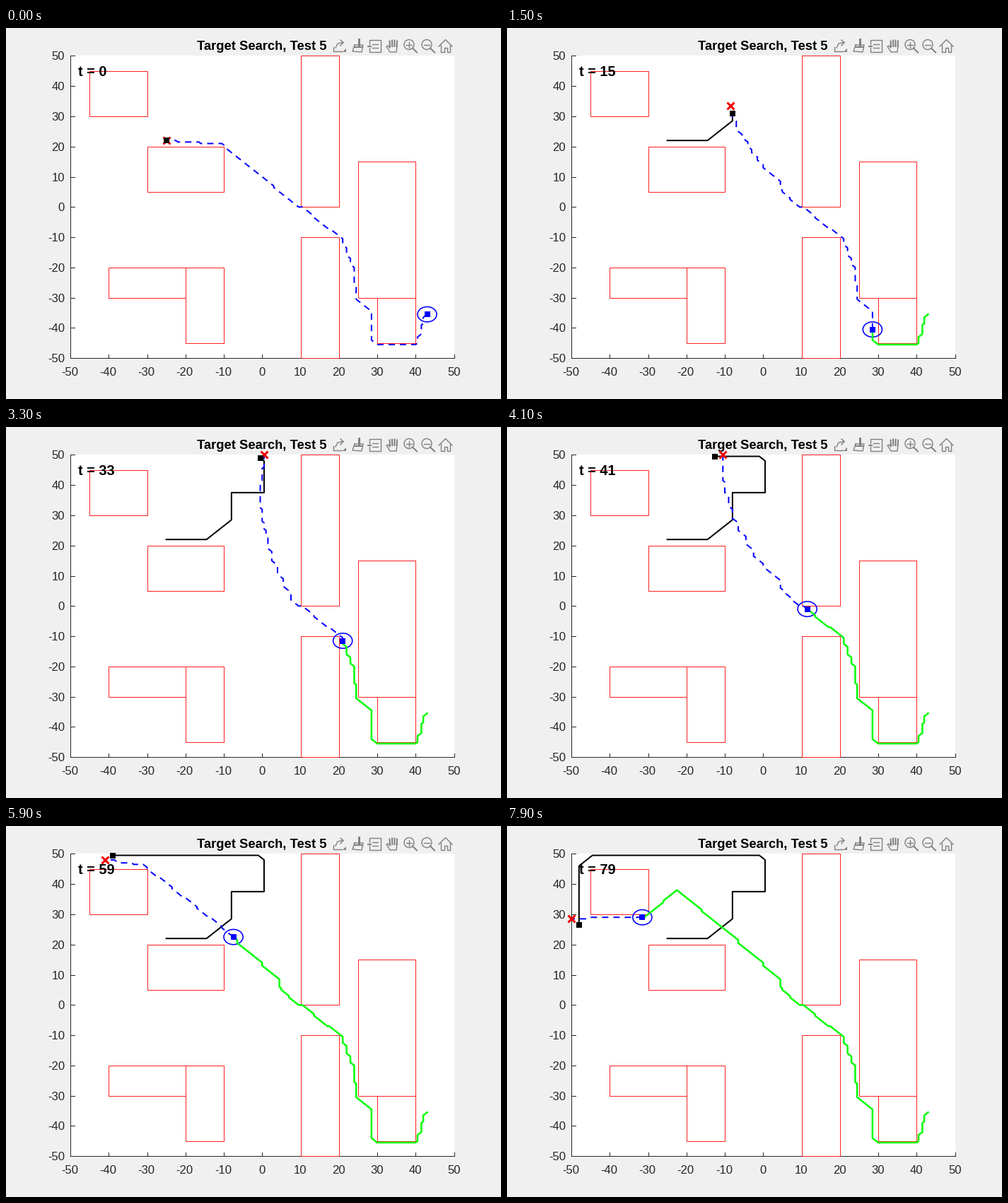
A matplotlib script for the animation above (8000 ms loop, 700 by 525 pixels).

```python
import numpy as np
import matplotlib.pyplot as plt
from matplotlib.animation import FuncAnimation
from matplotlib.patches import Circle, Ellipse, Polygon, Rectangle

W, H, DPI = 700, 525, 100
STEPS, STEP_MS = 80, 100
PT = 72 / DPI  # points per pixel
INK, GREY, BLUE = "#262626", "#808080", "#0000ff"
# Plot box as fractions of the stage, and pixels per data unit.
X0, Y0 = 0.13 * W, H - 0.11 * H
SX, SY = 0.775 * W / 100, 0.815 * H / 100

plt.rcParams["font.family"] = "Liberation Sans"


def px(p):
    """Data units to stage pixels."""
    p = np.asarray(p, float)
    return np.stack([X0 + SX * (p[..., 0] + 50), Y0 - SY * (p[..., 1] + 50)], axis=-1)


def snap(p):
    return np.round(np.asarray(p) * 2) / 2


def grid_route(pts):
    """Join points as on a grid: short blocks of a diagonal, then a straight."""
    out = [np.array(pts[0], float)]
    for goal in np.array(pts[1:], float):
        start = out[-1]
        blocks = max(round(np.abs(goal - start).max() / 3.3), 1)
        for u in np.arange(1, blocks + 1) / blocks:
            stop = goal if u == 1 else snap(start + u * (goal - start))
            d = stop - out[-1]
            out += [out[-1] + np.sign(d) * np.abs(d).min(), stop]
    return np.array(out)


class Path:
    """Polyline that can be read by arc length."""

    def __init__(self, pts):
        self.pts = np.array(pts, float)
        self.cum = np.r_[0, np.cumsum(np.hypot(*np.diff(self.pts, axis=0).T))]

    def at(self, s):
        return np.array([np.interp(s, self.cum, c) for c in self.pts.T])

    def part(self, a, b):
        inner = self.pts[(self.cum > a) & (self.cum < b)]
        return np.vstack([self.at(a), inner, self.at(b)])

    def length_to(self, p):
        return self.cum[np.argmin(np.hypot(*(self.pts - p).T))]


GAP, HUB = (9.5, 0), (0, 14)
QUARRY_SPEED, SEEKER_SPEED = 1.49, 1.79

quarry = Path([(-25, 22), (-14.5, 22), (-8, 28.5), (-8, 37.5), (0.5, 37.5),
               (0.5, 48), (-1, 49.5), (-44.5, 49.5), (-48, 46), (-48, 26.5)])
seeker = Path(grid_route([
    (43, -35.5), (40.5, -45), (40, -45.5), (30, -45.5), (28.5, -43.5),
    (28.5, -34.5), (24.5, -30), (24.5, -26), (24, -20), (21, -10.5),
    (13.5, -3), GAP, (5, 5.5), (4.5, 8.5), HUB, (-10, 25), (-22.5, 38),
    (-30, 30), (-31.5, 29)]))
GAP_S, HUB_S = seeker.length_to(GAP), seeker.length_to(HUB)

# The estimate drifts around the quarry and stays inside the arena.
DRIFT_AT = [0, 15, 24, 41, 52, 66, 79]
DRIFT_X = [0, -.5, -.5, 2, -1.5, -2, -2]
DRIFT_Y = [0, 2.5, 1, .5, -1, -2.5, 2]


def guess(k):
    drift = np.array([np.interp(k, DRIFT_AT, d) for d in (DRIFT_X, DRIFT_Y)])
    return np.clip(snap(quarry.at(QUARRY_SPEED * k) + drift), -50, 50)


def bend(a, b):
    """Curve that climbs more steeply towards its end."""
    d = b - a
    bow = 0.1 * max(d[1] - abs(d[0]), 0)
    u = np.linspace(0, 1, max(int(np.hypot(*d) / 4), 2))[:, None]
    mid = (a + b) / 2 - (2 * bow, 0)
    return snap((1 - u) ** 2 * a + 2 * u * (1 - u) * mid + u ** 2 * b)


def plan(k):
    """Planned way from the seeker to the estimate, round wall corners."""
    s, goal = SEEKER_SPEED * k, guess(k)
    here = seeker.at(s)
    early, late = k < 8, k > 70
    hub_s = GAP_S if early or goal[0] > -5 else HUB_S
    head = seeker.part(s, hub_s) if s < hub_s else snap(here)[None]
    if early:
        corners = [(-10, 20.5)]
    elif late:
        corners = [c for c in [(-30, 29.5), (-45.5, 29)] if c[0] < here[0]]
    else:
        corners = [c for c in [(-30, 45.5), (-45, 45.5)] if c[0] > goal[0] + 1]
    tail = [head[-1], *corners, goal] if corners else bend(head[-1], goal)
    return np.vstack([head, grid_route(tail)])


fig = plt.figure(figsize=(W / DPI, H / DPI), dpi=DPI, facecolor="#f0f0f0")
ax = fig.add_axes([0, 0, 1, 1])
ax.set(xlim=(0, W), ylim=(H, 0))
ax.axis("off")


def line(pts, color, width, **kw):
    x, y = np.array(pts, float).reshape(-1, 2).T
    return ax.plot(x, y, color=color, lw=width * PT, **kw)[0]


def label(x, y, s, size, **kw):
    return ax.text(x, y, s, fontsize=size * PT, va="baseline", **kw)


def rect(x, y, w, h, **kw):
    ax.add_patch(Rectangle(px((x, y)), w * SX, -h * SY, **kw))


def draw_axes():
    rect(-50, -50, 100, 100, fc="white", ec="none", zorder=0)
    line(px([(-50, 50), (-50, -50), (50, -50)]), INK, 1, zorder=1)
    for v in range(-50, 51, 10):
        x, y = px((v, v))
        line([(x, Y0), (x, Y0 - 5.5)], INK, 1, zorder=1)
        line([(X0, y), (X0 + 5.5, y)], INK, 1, zorder=1)
        label(x - (v < 0), 491.5, str(v), 16.67, color=INK, ha="center")
        label(X0 - 8, y + 6, str(v), 16.67, color=INK, ha="right")
    label(361.5, 31, "Target Search, Test 5", 18.33, weight="bold", ha="center")


def draw_walls():
    for box in [(-45, 30, 15, 15), (-30, 5, 20, 15), (-40, -30, 20, 10),
                (-20, -45, 10, 25), (10, 0, 10, 50), (10, -50, 10, 40),
                (25, -30, 15, 45), (30, -45, 10, 15)]:
        rect(*box, fc="none", ec="#ff2020", lw=PT, zorder=2)


def draw_toolbar():
    def stroke(*pts, width=1.4):
        line(pts, GREY, width)

    # share
    stroke((463, 27), (463, 32.5), (475, 32.5))
    stroke((466, 28), (469, 22), (477, 20.5))
    stroke((473, 17), (477, 20.5), (473, 25))
    ax.add_patch(Polygon([(476, 34), (481, 34), (481, 29)], fc=GREY, ec="none"))
    # brush
    stroke((499, 16), (499, 24), width=3)
    stroke((493, 24), (505, 24), (503, 34), (490, 33), (493, 24))
    stroke((493, 27), (504, 27), width=2)
    # data tip
    stroke((514, 23), (514, 17), (530, 17), (530, 34), (514, 34), (514, 28))
    for y in (23, 28):
        stroke((518, y), (526, y))
    stroke((512, 25.5), (516, 25.5), width=2)
    # hand
    stroke((553, 25), (552, 34), (543, 34), (538, 26), (540, 25), (543, 28))
    for i in range(4):
        stroke((542.5 + 3.5 * i, 17 + abs(i - 1.5)), (543 + 3.2 * i, 26), width=2)
    # magnifiers
    for x in (570, 595):
        ax.add_patch(Circle((x, 23.5), 7, fc="none", ec=GREY, lw=1.4 * PT))
        stroke((x + 5, 28.5), (x + 11, 34.5), width=2)
        stroke((x - 4, 23.5), (x + 4, 23.5))
    stroke((570, 19.5), (570, 27.5))
    # home
    stroke((612, 26), (621.5, 16.5), (631, 26))
    stroke((615, 24), (615, 34), (619.5, 34), (619.5, 28), (623.5, 28),
           (623.5, 34), (628, 34), (628, 24))


draw_axes()
draw_walls()
draw_toolbar()

plan_line = line([], BLUE, 2, ls=(0, (4.5, 3.5)), dash_capstyle="butt", zorder=4)
quarry_line = line([], "black", 2, zorder=3)
ring = ax.add_patch(Ellipse((0, 0), 5 * SX, 5 * SY, fc="none", ec=BLUE,
                            lw=1.6 * PT, zorder=5))
seeker_line = line([], "#00ff00", 2.5, zorder=6)
cross = line([], "#f00000", 0, marker="x", ms=9.5 * PT, mew=3 * PT, zorder=7)
quarry_dot = line([], "black", 0, marker="s", ms=8 * PT, mew=0, zorder=8)
seeker_dot = line([], BLUE, 0, marker="s", ms=8 * PT, mew=0, zorder=8)
clock = label(101.5, 68, "", 20, weight="bold", zorder=9)


def put(artist, pts):
    artist.set_data(*px(pts).reshape(-1, 2).T)


def update(k):
    quarry_s, seeker_s = QUARRY_SPEED * k, SEEKER_SPEED * k
    here = snap(seeker.at(seeker_s))
    put(plan_line, plan(k))
    put(quarry_line, quarry.part(0, quarry_s))
    put(seeker_line, seeker.part(0, seeker_s))
    put(cross, guess(k))
    put(quarry_dot, snap(quarry.at(quarry_s)))
    put(seeker_dot, here)
    ring.set_center(px(here))
    clock.set_text(f"t = {k}")
    return ()


anim = FuncAnimation(fig, update, frames=STEPS, interval=STEP_MS,
                     repeat=True, repeat_delay=0)
plt.show()
```
